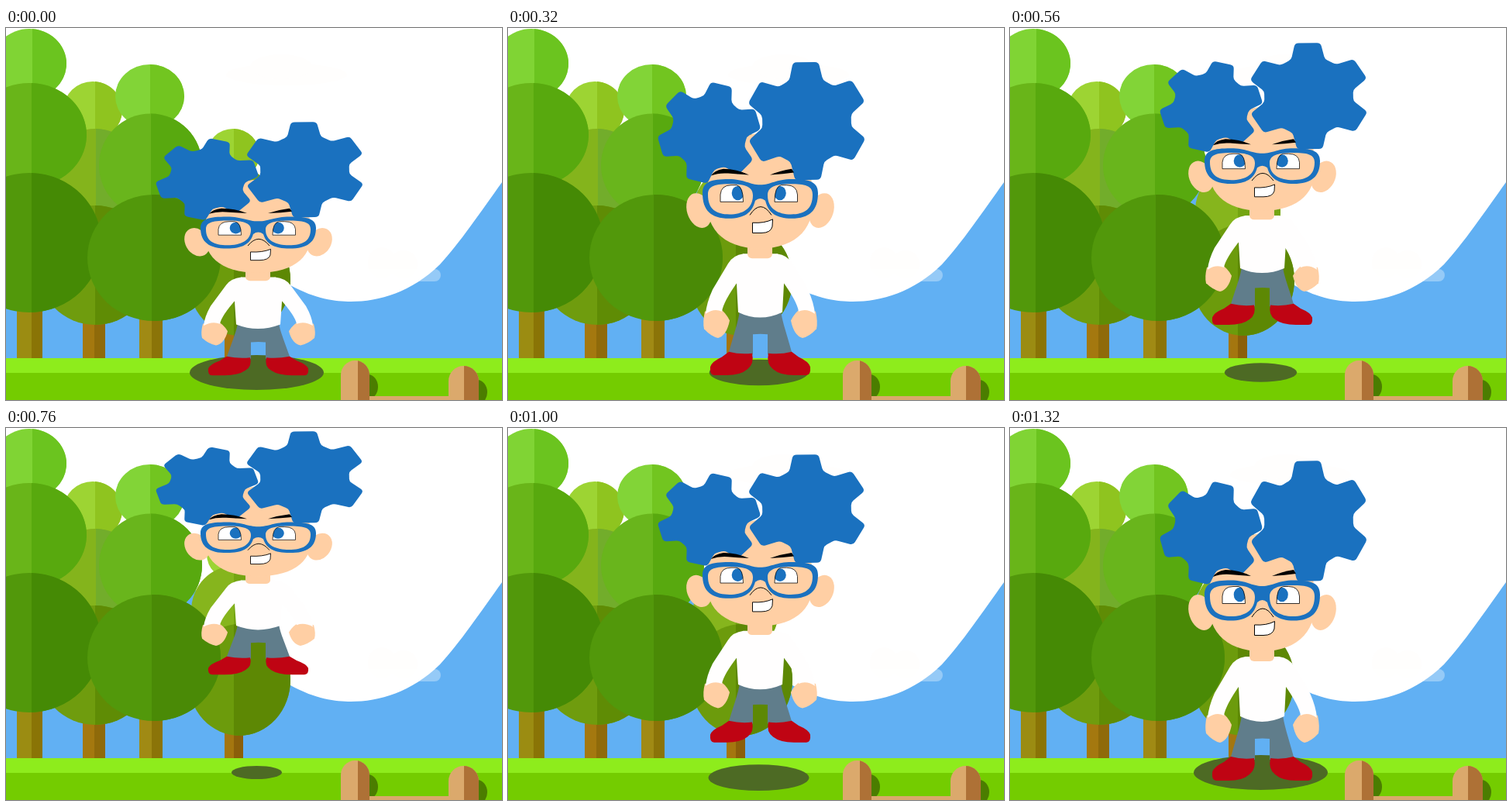
These frames come from a looping animation (640x480 px, 2.88 s). An HTML page with a canvas:

```html
<!DOCTYPE html>
<html lang="en">
<head>
<meta charset="utf-8">
<title>Jump</title>
<style>
  html, body { margin: 0; width: 100%; height: 100%; overflow: hidden; background: #fff; }
  canvas { display: block; width: 640px; height: 480px; }
</style>
</head>
<body>
<canvas id="stage" width="640" height="480"></canvas>
<script>
const LOOP = 2880, STEP = 40;
const SKIN = '#ffcfa4', BLUE = '#1a71bf', SHIRT = '#fffefe', PANTS = '#607d8b', RED = '#bf0413';
const REST_TOP = 42, REST_HEIGHT = 414;
const stage = document.getElementById('stage');
const back = document.createElement('canvas');
back.width = 640;
back.height = 480;
let ctx = back.getContext('2d');

// time, top and bottom of the figure
const bodyKeys = [
  [0, 121, 449], [360, 34, 449], [760, 4, 319], [1160, 54, 465], [1320, 42, 456]
];
// time, centre y and radii of the ground shadow
const shadowKeys = [
  [0, 444.5, 86.5, 22.5], [760, 444.5, 32.5, 8.6], [1160, 455.6, 86.5, 22.5], [1320, 444.5, 86.5, 22.5]
];

function valuesAt(keys, t) {
  const last = keys[keys.length - 1];
  if (t >= last[0]) return last.slice(1);
  const i = keys.findIndex(k => k[0] > t);
  const a = keys[i - 1], b = keys[i];
  const u = (t - a[0]) / (b[0] - a[0]);
  return a.slice(1).map((v, n) => v + (b[n + 1] - v) * u);
}

function fill(shape, color, rule) {
  ctx.fillStyle = color;
  ctx.fill(typeof shape === 'string' ? new Path2D(shape) : shape, rule || 'nonzero');
}

function line(d, width = 1) {
  ctx.strokeStyle = '#000';
  ctx.lineWidth = width;
  ctx.stroke(new Path2D(d));
}

function oval(x, y, rx, ry, color, turn = 0) {
  const p = new Path2D();
  p.ellipse(x, y, rx, ry, turn, 0, 7);
  fill(p, color);
}

function rect(x, y, w, h, color) {
  ctx.fillStyle = color;
  ctx.fillRect(x, y, w, h);
}

// Ellipse with its right part in a darker tone
function ball(x, y, rx, ry, split, light, dark) {
  oval(x, y, rx, ry, light);
  const a = Math.acos((split - x) / rx);
  const p = new Path2D();
  p.ellipse(x, y, rx, ry, 0, -a, a);
  fill(p, dark);
}

function trunk(x, split, end, light, dark) {
  rect(x, 350, split - x, 76, light);
  rect(split, 350, end - split, 76, dark);
}

function post(x, split, end, top) {
  const r = (end - x) / 2;
  const p = new Path2D();
  p.roundRect(x, top, end - x, 90, r);
  oval(end - 2, top + 34, 13, 16, '#4b7d00');
  fill(p, '#dba96c');
  ctx.save();
  ctx.clip(p);
  rect(split, top, end - split, 90, '#ae7136');
  ctx.restore();
}

function gear(x, y, r, phase) {
  const pts = [];
  for (let i = 0; i < 6; i++) {
    for (const [off, k] of [[-22, .73], [-12, 1], [12, 1], [22, .73]]) {
      const a = (phase + i * 60 + off) * Math.PI / 180;
      pts.push([x + Math.cos(a) * r * k, y + Math.sin(a) * r * k]);
    }
  }
  const p = new Path2D();
  const end = pts[pts.length - 1];
  p.moveTo((pts[0][0] + end[0]) / 2, (pts[0][1] + end[1]) / 2);
  pts.forEach((q, i) => {
    const n = pts[(i + 1) % pts.length];
    p.arcTo(q[0], q[1], n[0], n[1], i % 4 === 1 || i % 4 === 2 ? 6 : 9);
  });
  p.closePath();
  fill(p, BLUE);
}

// Draws a part and its mirror image, the latter moved by dx
function mirrored(draw, dx = 0) {
  draw();
  ctx.save();
  ctx.transform(-1, 0, 0, 1, 651 + dx, 0);
  draw();
  ctx.restore();
}

function drawScene() {
  rect(0, 0, 640, 480, '#fff');
  oval(362, 60, 78, 14, '#fffefd');
  oval(355, 50, 40, 16, '#fffefd');
  oval(485, 303, 18, 20, '#fffefd');
  oval(513, 305, 18, 18, '#fffefd');
  fill('M0 300L190 150C250 210 300 285 367 332C400 350 425 353 445 353C482 353 523 341 560 305' +
    'C585 278 612 238 640 199V430H0Z', '#61b0f3');
  const cloud = new Path2D();
  cloud.roundRect(460, 311, 101, 16, 8);
  fill(cloud, 'rgba(255,255,255,.33)');

  trunk(99, 114, 128, '#a4780f', '#8f6a0a');
  ball(112, 106, 38, 37, 115, '#9dd433', '#8fc41f');
  ball(115, 195, 62, 65, 116, '#84b41c', '#72ad2b');
  ball(115, 306, 75, 77, 115, '#6f9c0e', '#5f8c05');

  trunk(282, 294, 306, '#a4760f', '#8b5f0a');
  ball(293, 163, 34, 33, 294, '#9dd433', '#8fc41f');
  ball(294, 236, 55, 58, 294, '#86b51d', '#74a512');
  ball(301, 325, 66, 72, 294, '#6c9b0c', '#5d8804');

  trunk(14, 33, 47, '#9b8c12', '#8a7406');
  ball(30, 46, 48, 45, 34, '#80d434', '#6bc41f');
  ball(30, 138, 74, 67, 33, '#69b519', '#58a90e');
  ball(30, 277, 93, 90, 33, '#52980b', '#458a05');

  trunk(172, 188, 202, '#a08a14', '#8b7408');
  ball(185.5, 88, 44.5, 41, 186, '#82d437', '#72c520');
  ball(186.5, 177, 66.5, 66.5, 187, '#69b51c', '#58a90f');
  ball(191, 296.5, 86, 81.5, 188, '#52980b', '#4a8a06');

  rect(0, 426, 640, 19, '#8eec1c');
  rect(0, 445, 640, 35, '#74cc00');
  post(432, 454, 469, 429);
  post(571, 591, 610, 436);
  rect(469, 475, 102, 5, '#dba96c');
}

function drawBody() {
  fill('M299 368H352C353 382 358 395 367 428H335V401Q326 400 316 401V428H284' +
    'C293 395 298 382 299 368Z', PANTS);
  mirrored(() => {
    fill('M285 424Q300 428 315 426Q318 440 309 447Q300 455 282 455H266Q260 455 261 444Q263 437 276 431Z', RED);
    fill('M254 371Q251 385 253 394Q262 404 271 406Q282 403 286 383Q281 372 272 366Z', SKIN);
    fill('M304 295Q290 297 284 308L264 342Q256 360 255 374Q266 366 276 371Q278 358 297 331L315 310Z', SHIRT);
  });
  fill('M304 295H347Q358 300 356 335L354 372Q325 386 297 372L295 335Q292 300 304 295Z', SHIRT);
  const neck = new Path2D();
  neck.roundRect(309, 275, 32, 26, 6);
  fill(neck, SKIN);
}

function drawHead() {
  oval(246.5, 238, 15.5, 23.5, SKIN, -.3);
  oval(404.5, 238, 15.5, 23.5, SKIN, .3);
  fill('M257 215C252 259 276 288 325 288S398 259 393 215C393 170 365 138 325 136' +
    'C290 138 257 170 257 215Z', SKIN);
  gear(259.5, 135.5, 67, -76);
  gear(385.5, 120, 79.3, -91);
  fill('M262 192Q266 185 278 183Q295 183 311 191Q296 190 284 189Q272 188 262 192Z', '#000');
  fill('M338 191Q352 185 366 183L369 188Q355 190 338 191Z', '#000');

  mirrored(() => {
    const eye = 'M274 226.5V217Q275 204.5 288 204.5H295Q303.5 206 303.5 226.5Z';
    fill(eye, '#fff');
    ctx.save();
    ctx.clip(new Path2D(eye));
    oval(296.5, 215, 7.8, 9.3, BLUE);
    ctx.restore();
    line(eye, .8);
  }, -3.5);

  fill('M251 215C251 200 262 196.5 285 196.5C305 196.5 312 204 325.5 204C339 204 346 196.5 366 196.5' +
    'C389 196.5 400 200 400 215C400 238 389 248.5 366 248.5C346 248.5 336 241 332 225' +
    'Q325.5 219 319 225C315 241 305 248.5 285 248.5C262 248.5 251 238 251 215Z' +
    'M258 217C258 205 268 203 287 203C306 203 316 207 316 218C316 236 302 243 286 243C268 243 258 236 258 217Z' +
    'M393 217C393 205 383 203 364 203C345 203 335 207 335 218C335 236 349 243 365 243C383 243 393 236 393 217Z',
    BLUE, 'evenodd');

  const nose = 'M312 244Q326 222 340 244';
  fill(nose, SKIN);
  line(nose);
  const mouth = 'M315.5 254Q331 255 341.5 249.5L341 259Q339 267.5 327 267.5H315.5Z';
  fill(mouth, '#fff');
  line(mouth);
}

drawScene();
ctx = stage.getContext('2d');

function render(ms) {
  const t = Math.floor((ms % LOOP) / STEP) * STEP;
  const [top, bottom] = valuesAt(bodyKeys, t);
  const [y, rx, ry] = valuesAt(shadowKeys, t);
  const scale = (bottom - top) / REST_HEIGHT;
  ctx.drawImage(back, 0, 0);
  oval(323.5, y, rx, ry, '#4d6a24');
  ctx.save();
  ctx.transform(1, 0, 0, scale, 0, top - REST_TOP * scale);
  drawBody();
  drawHead();
  ctx.restore();
}

const start = performance.now();
function tick() {
  render(performance.now() - start);
  requestAnimationFrame(tick);
}
tick();
</script>
</body>
</html>
```
